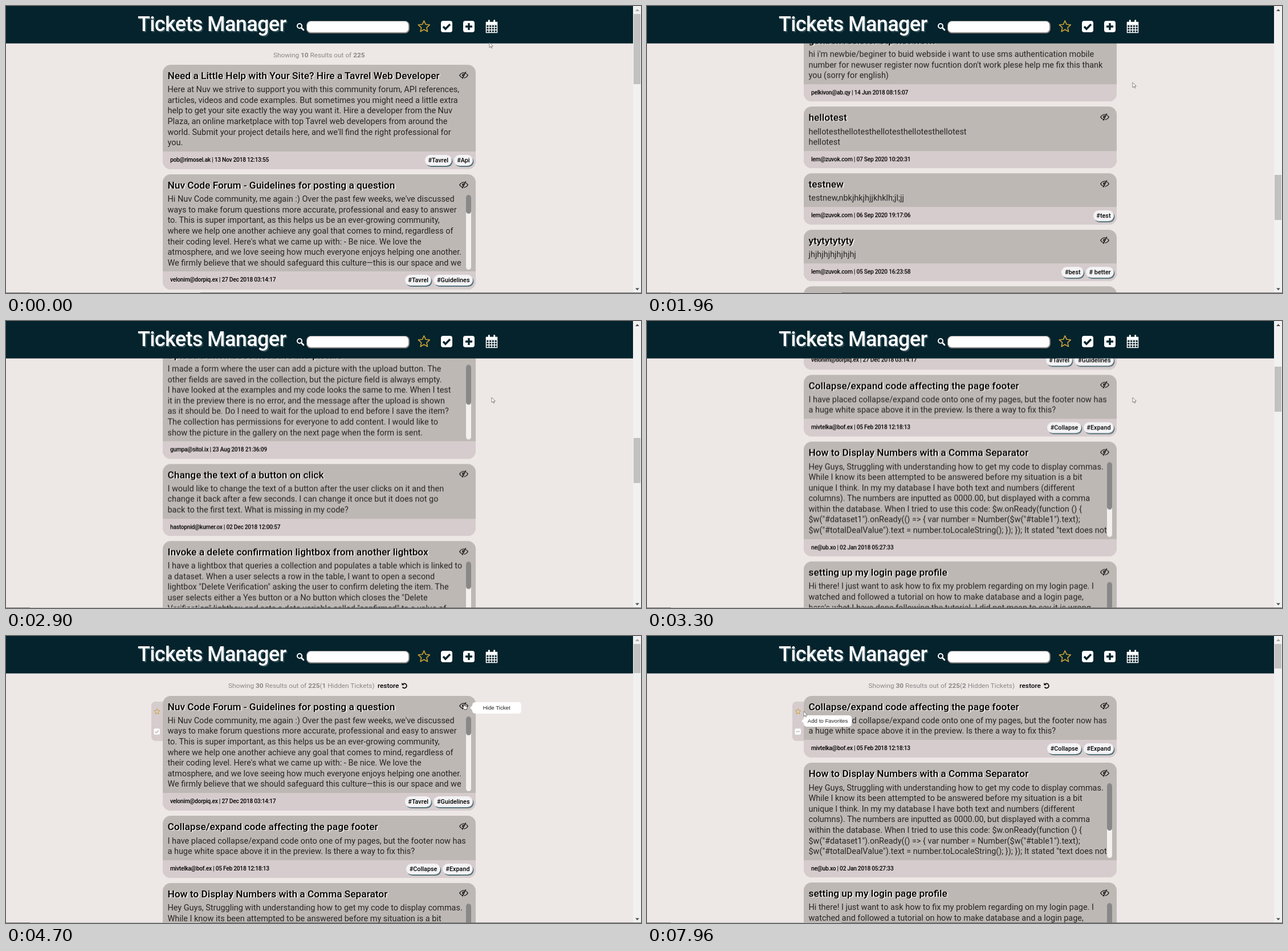
An HTML page for the animation above (8000 ms loop, 1114 by 503 pixels).

```html
<!DOCTYPE html>
<html lang="en">
<head>
<meta charset="utf-8">
<title>Tickets Manager</title>
<style>
html, body { margin: 0; width: 100%; height: 100%; overflow: hidden; }
body { background: #ede7e6; font-family: Roboto, "Open Sans", sans-serif; color: #000; }
#stage { position: relative; width: 1114px; height: 503px; overflow: hidden; background: #ede7e6; }
#stage > *, .abs { position: absolute; }
svg { display: block; overflow: visible; }

#head { left: 0; top: 0; width: 1100px; height: 65px; background: #04232c; background-clip: padding-box; border-bottom: 1px solid rgba(4,35,44,.6); }
#head h1 { left: 231px; top: 9px; margin: 0; font: 500 36px/46px Roboto, sans-serif; letter-spacing: -.65px;
  color: #fff; text-shadow: 2px 2px 1px #34505a; white-space: nowrap; }
#search { left: 527px; top: 26px; width: 178px; height: 19px; border-radius: 8px; background: #fff;
  border: solid #8b8585; border-width: 1px 2px 2px 1px; }

#page { left: 0; top: 0; width: 1100px; will-change: transform; }
#info { left: 0; width: 1100px; font-size: 11.8px; line-height: 16px; color: #8b8786; white-space: pre; }
#info span { position: absolute; top: 0; }
#info b { font-weight: 700; }
#restore { color: #000; font-weight: 500; }
#restore svg { position: absolute; left: 42px; top: 3px; }

#list { left: 275px; width: 549px; }
.card { position: relative; margin-bottom: 9.1px; border-radius: 14px; overflow: hidden; background: #bdb8b4; }
.card h2 { left: 8.5px; top: 8px; margin: 0; font: 500 17.3px/22px Roboto, sans-serif; text-shadow: 2px 1px 1px #f4f1ef; white-space: nowrap; }
.card .eye { left: 520px; top: 11.5px; }
.card p { margin: 0; padding: 35.2px 0 5px 8.5px; font-size: 14.45px; line-height: 18.6px; color: #262524; white-space: pre; }
.card footer { position: relative; height: 30.4px; background: #d6cccd; }
.card footer.tagged { height: 31.2px; }
.meta { left: 13px; top: 8px; font-weight: 500; font-size: 10.2px; line-height: 14px; letter-spacing: -.25px; white-space: nowrap; }
.tags { right: 5px; top: 6px; display: flex; gap: 4px; }
.tags span { height: 19px; padding: 0 5.5px; border-radius: 10px; background: #f3f2f4; box-shadow: 1.5px 2px 0 #56737c;
  font-weight: 500; font-size: 10.8px; line-height: 19px; white-space: nowrap; }
.bar { left: 532px; top: 36px; width: 9px; height: 131px; border-radius: 5px; background: #f3f0f0; }
.bar i { display: block; border-radius: 5px; background: #888; }

#tab { left: 255px; width: 20px; height: 69.5px; border-radius: 7px 0 0 7px; background: #d6cccd; }
#tip { height: 20px; border-radius: 5px; background: #fff; color: #222; text-align: center;
  font: 9.7px/20px "Liberation Sans", Arial, sans-serif; white-space: nowrap; }
#tip::before { content: ""; position: absolute; left: -4px; top: 6px; border: solid transparent; border-width: 4px 4px 4px 0; border-right-color: #fff; }

#track { left: 1099.5px; top: 0; width: 14.5px; height: 503px; background: #f1f1f1; }
#thumb { width: 12px; background: #c1c1c1; }
#edge { left: 0; top: 502px; width: 1114px; height: 1px;
  background: linear-gradient(90deg, #777 42px, #bbb 42px, #bbb 341px, #777 341px); }
</style>
</head>
<body>
<div id="stage">
  <div id="page">
    <div id="info" class="abs"><span id="count"></span><span id="restore">restore</span></div>
    <div id="list" class="abs"></div>
  </div>
  <div id="tab"></div>
  <div id="head">
    <h1 class="abs">Tickets Manager</h1>
    <div id="search" class="abs"></div>
    <svg id="tools" class="abs" width="1100" height="66"></svg>
  </div>
  <div id="track">
    <div id="thumb" class="abs"></div>
    <svg class="abs" width="14" height="503"><path id="up" d="M4 9L7.5 5.2 11 9z"/><path id="down" d="M4 494.5L7.5 498.3 11 494.5z"/></svg>
  </div>
  <div id="tip"></div>
  <svg id="cursor" width="14" height="18">
    <path id="arrow" d="M0 0V8.8L2.1 7 3.4 10 4.8 9.4 3.5 6.4H6.3z" fill="#fff" stroke="#555" stroke-width=".7"/>
    <path id="hand" d="M2 .8Q3.3.3 3.5 1.4V4.4L7.4 5.4Q8.4 5.9 8.2 7L7.4 10.8H3L.2 7.3Q-.2 6 1.6 6.3V1.4z" fill="#fff" stroke="#222" stroke-width=".8"/>
    <path id="beam" d="M-2 0Q0 0 0 1.5 0 0 2 0M0 1.5V9.5M-2 11Q0 11 0 9.5 0 11 2 11" fill="none" stroke="#333" stroke-width="1"/>
  </svg>
  <div id="edge"></div>
</div>
<script>
const LOOP = 8000;
const $ = id => document.getElementById(id);
const GOLD = '#cda339', DARK = '#04232c';

function star(cx, cy, r, width) {
  const pts = Array.from({ length: 10 }, (_, i) => {
    const a = (i * 36 - 90) * Math.PI / 180, q = i % 2 ? r * .47 : r;
    return (cx + q * Math.cos(a)).toFixed(2) + ',' + (cy + q * Math.sin(a)).toFixed(2);
  });
  return `<polygon points="${pts.join(' ')}" fill="none" stroke="${GOLD}" stroke-width="${width}" stroke-linejoin="round"/>`;
}

function box(cx, cy, size, mark, ink) {
  const h = size / 2, u = size / 20;
  const d = {
    check: 'M-6 0L-2 4.2 6-4', plus: 'M-6 0H6M0-6V6', minus: 'M-6 0H6'
  }[mark];
  return `<rect x="${cx - h}" y="${cy - h}" width="${size}" height="${size}" rx="${4 * u}" fill="#fff"/>` +
    `<path transform="translate(${cx} ${cy}) scale(${u})" d="${d}" fill="none" stroke="${ink}" stroke-width="3.4"/>`;
}

const calendar = `<path d="M842.5 28.5H861.5V46.5H842.5zM842.5 33H861.5M842.5 37.5H861.5M842.5 42H861.5M847.3 33V46.5M852 33V46.5M856.7 33V46.5"
  fill="none" stroke="#fff" stroke-width="1.5"/><path d="M842 28H862V32.5H842z" fill="#fff"/>
  <path d="M847.3 25.5V29.5M856.7 25.5V29.5" stroke="#fff" stroke-width="3" stroke-linecap="round"/>`;

$('tools').innerHTML =
  '<circle cx="515" cy="35" r="4" fill="none" stroke="#fff" stroke-width="2"/><path d="M518 38L522 42" stroke="#fff" stroke-width="2.6" stroke-linecap="round"/>' +
  star(733.3, 36.3, 10.5, 1.6) + box(773, 36, 20, 'check', DARK) + box(812, 36, 20, 'plus', DARK) + calendar;

$('restore').innerHTML += '<svg width="10" height="10"><path d="M1.8 2.8A4 4 0 1 1 1.6 7.6" fill="none" stroke="#000" stroke-width="1.7"/><path d="M.3 0V4.3H4.6z"/></svg>';

const eye = `<svg class="abs eye" width="16" height="13" fill="none" stroke="#000" stroke-width="1.2">
  <path d="M.7 6.5Q3.6 2 8 2T15.3 6.5Q12.4 11 8 11T.7 6.5z"/><path d="M12.9 1L6.7 12.4" stroke="#bdb8b4"/>
  <path d="M11.8.4L5.4 12.4" stroke-width="1.3"/><path d="M8 4A2.6 2.6 0 0 0 5.9 8z" fill="#000" stroke-width=".6"/></svg>`;

// title, body, author and date, tags, inner thumb height
const tickets = [
  ['Need a Little Help with Your Site? Hire a Tavrel Web Developer',
    "Here at Nuv we strive to support you with this community forum, API references,\narticles, videos and code examples. But sometimes you might need a little extra\nhelp to get your site exactly the way you want it. Hire a developer from the Nuv\nPlaza, an online marketplace with top Tavrel web developers from around the\nworld. Submit your project details here, and we'll find the right professional for\nyou.",
    'pob@rimosel.ak | 13 Nov 2018 12:13:55', '#Tavrel,#Api'],
  ['Nuv Code Forum - Guidelines for posting a question',
    "Hi Nuv Code community, me again :) Over the past few weeks, we've discussed\nways to make forum questions more accurate, professional and easy to answer\nto. This is super important, as this helps us be an ever-growing community,\nwhere we help one another achieve any goal that comes to mind, regardless of\ntheir coding level. Here's what we came up with: - Be nice. We love the\natmosphere, and we love seeing how much everyone enjoys helping one another.\nWe firmly believe that we should safeguard this culture—this is our space and we",
    'velonim@dorpiq.ex | 27 Dec 2018 03:14:17', '#Tavrel,#Guidelines', 33],
  ['Collapse/expand code affecting the page footer',
    'I have placed collapse/expand code onto one of my pages, but the footer now has\na huge white space above it in the preview. Is there a way to fix this?',
    'mivtelka@bof.ex | 05 Feb 2018 12:18:13', '#Collapse,#Expand'],
  ['How to Display Numbers with a Comma Separator',
    'Hey Guys, Struggling with understanding how to get my code to display commas.\nWhile I know its been attempted to be answered before my situation is a bit\nunique I think. In my my database I have both text and numbers (different\ncolumns). The numbers are inputted as 0000.00, but displayed with a comma\nwithin the database. When I tried to use this code: $w.onReady(function () {\n$w("#dataset1").onReady(() => { var number = Number($w("#table1").text);\n$w("#totalDealValue").text = number.toLocaleString(); }); }); It stated "text does not',
    'ne@ub.xo | 02 Jan 2018 05:27:33', '', 83],
  ['setting up my login page profile',
    "Hi there! I just want to ask how to fix my problem regarding on my login page. I\nwatched and followed a tutorial on how to make database and a login page,\nhere's what I have done following the tutorial. I did not mean to say it is wrong,\nbut the page does not open the profile of the member who is logged in. I have\nchecked the names of the fields and the permissions of the collection and\nthey look the same as in the tutorial. The button shows after the login but\nit does not do anything when I click on it. Here is the code of the page:",
    'ta@obrik.ex | 11 Mar 2018 09:41:20', '', 64],
  ['Filter a repeater with two dropdowns',
    'I have a repeater connected to a dataset and two dropdowns above it. Each one\nof them works fine on its own, but when I choose a value in both of them the\nrepeater shows no items at all. I tried to set the filter again in the change\nevent of each dropdown, but only the last one is used. Is there a way to have\nboth values in the same filter? I also want to reset the list with a button, so\nthat all of the items are displayed again. Any help with this would be great,\nas I have been working on it for the past few days. This is my code so far:',
    'lorvi@temuk.ox | 19 Apr 2018 16:02:48', '', 58],
  ['Upload button does not save the picture',
    'I made a form where the user can add a picture with the upload button. The\nother fields are saved in the collection, but the picture field is always empty.\nI have looked at the examples and my code looks the same to me. When I test\nit in the preview there is no error, and the message after the upload is shown\nas it should be. Do I need to wait for the upload to end before I save the item?\nThe collection has permissions for everyone to add content. I would like to\nshow the picture in the gallery on the next page when the form is sent.',
    'gumpa@sitol.ix | 23 Aug 2018 21:36:09', '', 70],
  ['Change the text of a button on click',
    'I would like to change the text of a button after the user clicks on it and then\nchange it back after a few seconds. I can change it once but it does not go\nback to the first text. What is missing in my code?',
    'hastopnid@kumer.ox | 02 Dec 2018 12:00:57', ''],
  ['Invoke a delete confirmation lightbox from another lightbox',
    'I have a lightbox that queries a collection and populates a table which is linked to\na dataset. When a user selects a row in the table, I want to open a second\nlightbox "Delete Verification" asking the user to confirm deleting the item. The\nuser selects either a Yes button or a No button which closes the "Delete\nVerification" lightbox and sets a data variable called "confirmed" to a value of\neither "yes" or "no". Then, the first lightbox checks this return value and if "yes" it\ncalls the dataset1.remove function. The problem is the "Delete Verification"',
    'ku@ranofe.ix | 03 Dec 2018 05:34:42', '', 48],
  ['gonbex resister otp not work',
    "hi i'm newbie/beginer to buid webside i want to use sms authentication mobile\nnumber for newuser register now fucntion don't work plese help me fix this thank\nyou (sorry for english)",
    'pelkivon@ab.qy | 14 Jun 2018 08:15:07', ''],
  ['hellotest', 'hellotesthellotesthellotesthellotesthellotest\nhellotest', 'lem@zuvok.com | 07 Sep 2020 10:20:31', ''],
  ['testnew', 'testnew,nbkjhkjhjjkhklh;jl;jj', 'lem@zuvok.com | 06 Sep 2020 19:17:06', '#test'],
  ['ytytytytyty', 'jhjhjhjhjhjhjhj', 'lem@zuvok.com | 05 Sep 2020 16:23:58', '#best,# better'],
  ['the best title', 'even better content', 'dorn820@plimvorte.net.zz | 02 Sep 2020 16:07:07', '#best,# better'],
  ['lem12345', 'aaaaa', 'lem@zuvok.com | 01 Sep 2020 07:13:11', '#test'],
  ['lem123', 'hhhhhhhh', 'lem@zuvok.com | 01 Sep 2020 07:10:26', '#test'],
  ['test', 'test content', 'lem@zuvok.com | 01 Sep 2020 07:02:14', '#test'],
  ['new test', 'test test', 'lem@zuvok.com | 31 Aug 2020 18:44:52', '#test'],
  ['hello', 'hello hello', 'lem@zuvok.com | 31 Aug 2020 18:40:03', '#test']
];

const esc = s => s.replace(/&/g, '&amp;').replace(/</g, '&lt;');
const cards = tickets.map(([title, text, meta, tags, thumb]) => {
  const el = document.createElement('article');
  el.className = 'card';
  el.innerHTML = `<h2 class="abs">${title}</h2>${eye}<p>${esc(text)}</p>` +
    (thumb ? `<div class="abs bar"><i style="height:${thumb}px"></i></div>` : '') +
    `<footer class="${tags && 'tagged'}"><div class="abs meta">${meta}</div>` +
    (tags ? `<div class="abs tags">${tags.split(',').map(s => `<span>${s}</span>`).join('')}</div>` : '') + '</footer>';
  $('list').append(el);
  return el;
});

// Each move is [start, end, steps, value]; the first step lands at start.
function track(t, v, moves) {
  for (const [a, b, n, to] of moves) {
    if (t < a) break;
    const k = n === 1 ? 1 : Math.min(n, Math.floor((t - a) * (n - 1) / (b - a) + 1e-6) + 1);
    v += (to - v) * k / n;
  }
  return v;
}

const at = (time, v) => [time, time, 1, v];
const show = (el, on) => { el.style.display = on ? '' : 'none'; };
const put = (el, x, y) => { el.style.left = x + 'px'; el.style.top = y + 'px'; };
const html = (el, s) => { if (el.last !== s) el.innerHTML = el.last = s; };

function cursorAt(t) {
  return [
    track(t, 847.5, [at(500, 852), [4030, 4430, 7, 801], [5830, 6630, 13, 327], [6700, 7100, 7, 266], [7760, 7960, 4, 274.5]]),
    track(t, 64, [at(500, 134), [4030, 4430, 7, 118], [5830, 6630, 13, 165], [6700, 7100, 7, 166], [7760, 7960, 4, 132]])
  ];
}

function draw(t) {
  const scroll = track(t, 0, [at(500, 1495.8), [1830, 2100, 5, 2173.4], [2500, 3300, 11, 411.6], [3360, 3630, 5, 0]]);
  const hidden = t < 4700 ? 0 : t < 5500 ? 1 : 2;
  const loaded = t < 1560 ? 10 : t < 4700 ? 20 : 30;
  const top = hidden ? 104.7 : 103;

  $('page').style.transform = `translateY(${-scroll}px)`;
  $('list').style.top = top + 'px';
  cards.forEach((el, i) => show(el, i >= hidden && i < loaded));

  $('info').style.top = (hidden ? 79 : 78) + 'px';
  html($('count'), `Showing <b>${loaded}</b> Results out of <b>225</b>` +
    (hidden ? `(<b>${hidden}</b> Hidden Tickets)` : ''));
  $('count').style.left = [469, 390, 388.5][hidden] + 'px';
  show($('restore'), hidden);
  $('restore').style.left = (hidden === 1 ? 652 : 653.5) + 'px';

  put($('thumb'), 1.5, track(t, 14, [at(500, 366), at(1560, 256), [1830, 2100, 5, 356], [2500, 3300, 11, 80], [3360, 3630, 5, 14]]));
  $('thumb').style.height = track(t, 123, [at(1560, 81), at(1830, 79), at(4700, 51), at(5500, 43)]) + 'px';
  $('up').style.fill = scroll < 1 ? '#a3a3a3' : '#505050';
  $('down').style.fill = t >= 500 && t < 1560 ? '#a3a3a3' : '#505050';

  const [x, y] = cursorAt(t);
  const onEye = t > 4000 && x < 812 && x > 793;
  const onCheck = t >= 7100 && t < 7760;
  const onStar = t >= 7760;
  const onText = t > 5830 && x > 284 && x < 790 && y > 136;
  put($('cursor'), x, y);
  show($('hand'), onEye || onCheck);
  show($('beam'), onText);
  show($('arrow'), !onEye && !onCheck && !onText);

  show($('tab'), t > 4000 && x < 824);
  $('tab').style.top = top + 10 + 'px';
  html($('tab'), `<svg width="20" height="70">${star(10, 17.5, 5.2, 1)}${box(9.7, 52.5, 10.5, t < 7500 ? 'check' : 'minus', '#c9bfc0')}</svg>`);

  const tip = $('tip');
  show(tip, onEye || onCheck || onStar);
  html(tip, onEye ? 'Hide Ticket' : onStar ? 'Add to Favorites' : t < 7500 ? 'Mark as Complete' : 'Mark as Pending');
  tip.style.width = (onEye ? 86.5 : onStar ? 84 : 88.5) + 'px';
  if (onEye) put(tip, 817.5, top + 11.3);
  else put(tip, 275, track(t, 160.5, [[7760, 7960, 4, 139]]));
}

function tick(now) {
  draw(now % LOOP);
  requestAnimationFrame(tick);
}
draw(0);
requestAnimationFrame(tick);
</script>
</body>
</html>
```
